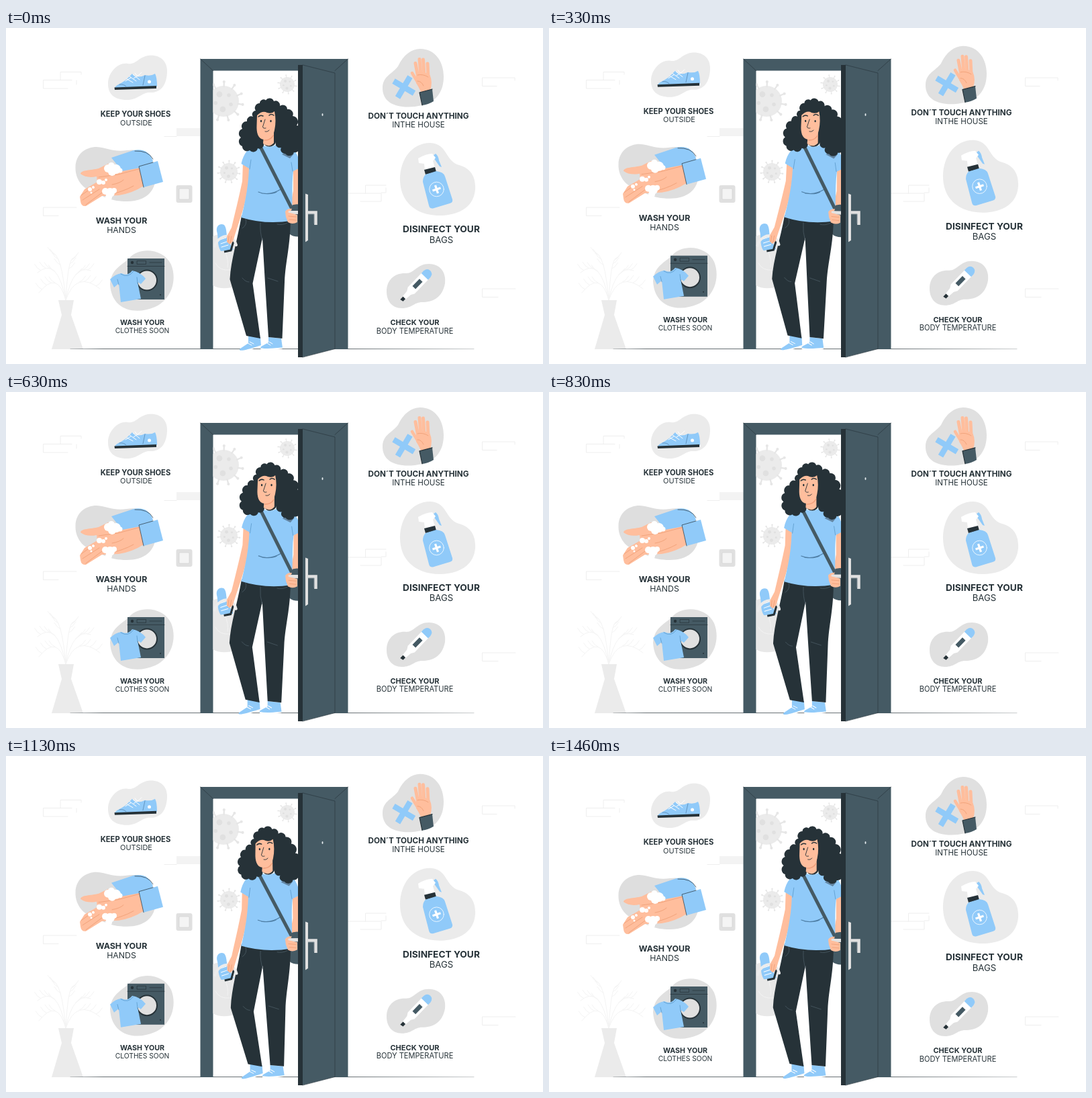
These frames come from a looping animation (800x500 px, 1500 ms). An HTML page:

```html
<!DOCTYPE html>
<html lang="en">
<head>
<meta charset="utf-8">
<title>Coming home safely</title>
<style>
  html, body { margin: 0; width: 100%; height: 100%; overflow: hidden; background: #fff; }
  svg { display: block; width: 100%; height: 100%; }
  text { font-family: Inter, sans-serif; fill: #263238; text-anchor: middle; }
  .b { font-weight: 700; }
  .blue { fill: #90caf9; }
  .dark { fill: #263238; }
  .slate { fill: #455a64; }
  .skin { fill: #ffbe9d; }
  .grey { fill: #e0e0e0; }
  .pale { fill: #ebebeb; }
  .white { fill: #fff; }
  .line { fill: none; stroke-linecap: round; stroke-linejoin: round; }
  .butt { fill: none; stroke-linejoin: miter; }
  .fold { stroke: #eb996e; stroke-width: .7; }
  .ink { stroke: #263238; }
  .lace { stroke: #fff; stroke-width: 1; }
</style>
</head>
<body>
<svg viewBox="0 0 800 500">
  <defs>
    <linearGradient id="fade" gradientUnits="userSpaceOnUse" x1="96" y1="0" x2="697" y2="0">
      <stop offset="0" stop-color="#263238" stop-opacity=".25"/>
      <stop offset=".08" stop-color="#263238" stop-opacity=".7"/>
      <stop offset=".7" stop-color="#263238" stop-opacity=".7"/>
      <stop offset="1" stop-color="#263238" stop-opacity=".25"/>
    </linearGradient>
    <clipPath id="opening"><path d="M308.500 63.500H436V500H308.500Z"/></clipPath>
  </defs>

  <!-- wall -->
  <g class="line" stroke="#eee">
    <path d="M81 77.500V65.500H112V69M98 77.500H55.500V90H92M105 78V84"/>
    <path d="M105 267H55.500V279.500H78M236 161.500H254"/>
    <path d="M758 78V74H709.500V86.500H731M759 388H709.500V400.500H733"/>
    <path d="M566 234H535.500V246M535 246H559V258H528M510 246H535M566 238V245H559"/>
  </g>
  <path fill="#f3f3f3" d="M254 149H290V161H254Z"/>
  <rect class="grey" x="253.500" y="234" width="24" height="26" rx="3"/>
  <rect x="258" y="239" width="15" height="16" rx="1" fill="#f4f4f4" stroke="#cfcfcf" stroke-width=".6"/>
  <g id="leaves" class="line" stroke="#f4f4f4"></g>
  <path class="pale" d="M78 405H101L97 427L115 478H68L83 427Z"/>
  <path class="line" stroke="url(#fade)" d="M96 477.500L697 477.600"/>

  <!-- doorway -->
  <path class="slate" d="M289.500 46H509.500V478H490V68H436V63.500H308.500V478H289.500Z"/>
  <path class="line ink" stroke-width=".6" d="M289.500 46L308.500 63.500M490 63.500L509.500 46"/>

  <g clip-path="url(#opening)">
    <g id="germs"></g>
    <path fill="#e8e8e8" d="M308 310C320 304 332 308 340 318C346 340 346 370 342 384C330 389 316 388 308 383Z"/>
    <path class="line" stroke="#f3f3f3" d="M312 350Q318 362 334 360M326 332Q332 345 330 356"/>
  </g>

  <g clip-path="url(#opening)">
    <g id="woman">
      <path class="skin" d="M428 205L440 204V276L422 274L428 242Z"/>
      <path class="slate" d="M423 265Q432 260 442 264V310Q428 312 422 306Z"/>
      <!-- legs and shoes -->
      <path class="blue" d="M361 457L379 460L380 473L352 481Q346 481 349 477L361 469Z"/>
      <path class="blue" d="M391 460L410 462L412 476L382 478Q377 477 380 474L391 468Z"/>
      <path class="line" stroke="#fff" stroke-width="1.800" d="M349 480.500Q352 482 380 473M380 477Q388 479 411 476.500"/>
      <path class="line lace" d="M360 469L366 472M363 467L369 470M389 469L394 472M392 467L397 470"/>
      <path class="dark" d="M351 279H424C424 325 416.500 345 415 378L411.500 462L391 460L386 380L382 312L367.500 380L379 462L358 458L333.500 374C335 345 345 315 351 279Z"/>
      <path class="line" stroke="#50616a" stroke-width=".7" d="M379 290Q378 304 382 316M362 378Q357 378 352 372M390 372L405 377M357 284Q360 293 352 298M404 292Q411 294 419 290"/>
      <!-- carried things and near arm -->
      <path class="blue" d="M314 302C313 294 319 290 325 293C330 299 327 310 332 318L339 330L320 332C314 323 317 313 314 302Z"/>
      <path class="line lace" d="M319 315L328 312M320 321L329 318M321 326L331 323"/>
      <path class="butt" stroke="#263238" stroke-width="3" d="M339 317L335 331L325 333"/>
      <path class="line" stroke="#ececec" stroke-width="4" d="M311 325C314 314 326 306 335 312Q341 315 343 323"/>
      <path class="skin" d="M353 200L365 205C362 235 358 256 350 280L341 308L338 318L333 322L329 318V310L336 297C341 276 347 252 352 228Z"/>
      <path class="line fold" d="M332 310L331 319M336 310L334 320"/>
      <!-- shirt -->
      <path class="blue" d="M376 171Q390 181 404 173L426 179Q434 184 440 207L428 213C425 235 428 258 425 287Q386 293 350.500 282C357 256 361 235 362 209L350.500 202C354 186 361 178 376 171Z"/>
      <path class="line" stroke="#5b9acb" stroke-width=".8" d="M363 210L365 196M427 213L425 200"/>
      <path class="line" stroke="#4f7fa6" stroke-width="1.200" d="M376 244Q392 251 411 239M381 246Q396 248 403 244"/>
      <path class="butt" stroke="#455a64" stroke-width="5" d="M376 171L427 271"/>
      <path d="M411 188Q420 182 429 187L423 194Z" fill="#6385a2"/>
      <!-- head -->
      <path id="hair" class="dark"/>
      <path class="skin" d="M384 158L399 151V171Q392 179 383 172Z"/>
      <path class="line" stroke="#f0a07c" stroke-width="1.600" d="M385 167Q394 167 398 160"/>
      <path class="skin" d="M374 130Q382 122 389 126Q396 128 400 124Q403 138 400 152C398 162 392 167 384 166C375 165 373 155 373.500 145Z"/>
      <path class="line ink" stroke-width="1.500" d="M376 132Q379 129 383 131M392 130Q395 127 399 130"/>
      <path class="line ink" stroke-width=".9" d="M386 136L382.500 147Q383 150 387 149M386 154Q390 155 392 152"/>
      <ellipse class="dark" cx="380" cy="138.500" rx="1.200" ry="1.700"/>
      <ellipse class="dark" cx="394.500" cy="138.500" rx="1.200" ry="1.700"/>
      <!-- hand on the handle -->
      <path class="grey" d="M420 272H437V277H420Z"/>
      <path class="skin" d="M416 273Q420 268 426 269L423 275L434 278V289Q427 293 420 289L417 281Z"/>
      <path class="line fold" d="M421 280L432 281M422 285L432 286"/>
      <path class="line" stroke="#e4e4e4" stroke-width="3" d="M422 273.500H436"/>
    </g>
  </g>

  <!-- open door -->
  <path class="slate" d="M441 55L490 67V477.500L441 490Z"/>
  <path class="dark" d="M435 55H442V490H435Z"/>
  <path class="line ink" stroke-width=".6" d="M442 55L490 67V477.500L442 490"/>
  <ellipse cx="471.500" cy="129" rx="1" ry="2" fill="#e8eef1"/>
  <path class="grey" d="M446 246.500L450 248V316L446 318.500Z"/>
  <path class="butt" stroke="#e0e0e0" stroke-width="4.500" d="M448 274.500H461.500V293"/>
  <path class="butt" stroke="#9aa5aa" stroke-width=".7" d="M450 277H459V291"/>

  <g id="tips">
    <!-- shoes -->
    <path class="pale" d="M152 83C152 65 168 51 181 53C194 55 196 44 212 41C230 39 241 50 240 66C239 88 228 97 214 96C202 96 197 107 180 107C161 107 152 98 152 83Z"/>
    <path class="blue" d="M162 89C164 84 174 82 180 76L188 68Q196 76 207 70Q216 72 222 68Q225 73 225 87L163 91Z"/>
    <path class="dark" d="M161.500 88.500L224 86V90L162 92Z"/>
    <path class="line lace" d="M180 76L189 81M184 72L194 79M189 69L199 77M178 79L186 74M190 75L198 70L202 66M192 67L196 72"/>
    <circle class="white" cx="213.500" cy="80" r="2.500"/>
    <path class="line" stroke="#4f7fa6" stroke-width=".7" d="M207 71L204 85M169 84Q175 83 179 87"/>
    <text class="b" x="193" y="132" font-size="11.200">KEEP YOUR SHOES</text>
    <text x="194" y="144.500" font-size="10.900">OUTSIDE</text>

    <!-- hands -->
    <path fill="#dedede" d="M103.500 207C104 187 119 177 135 177C151 178 160 185 180 182C207 178 224 194 223 220C223 246 205 258 180 258C152 258 145 249 127 243C112 237 103 223 103.500 207Z"/>
    <path class="blue" d="M157 193L190 182Q212 178 219 198L206 218L173 213Z"/>
    <path class="skin" d="M111 217C112 211 126 212 138 209L152 202L173 213L200 208L205 235Q188 246 168 249L143 250L119 265Q112 266 111 258L110 251L117 240L136 229L135 221Q120 224 111 217Z"/>
    <path class="line fold" d="M138 222L167 218L201 209M158 233Q170 231 175 226M114 256L139 240M119 263L143 245M112 249L132 235M150 249Q174 244 190 235"/>
    <path class="blue" d="M198 206L226 198L234 229L205 237Z"/>
    <path class="line ink" stroke-width=".7" d="M205 237L198 206L219 200M192 183Q212 182 219 195"/>
    <g id="foam" class="white"></g>
    <text class="b" x="172" y="291" font-size="12.400">WASH YOUR</text>
    <text x="172" y="305" font-size="12.300">HANDS</text>

    <!-- clothes -->
    <path class="grey" d="M155 381C157 357 174 353 184 342C199 325 235 328 246 352C256 377 245 405 222 415C192 428 157 420 155 381Z"/>
    <path class="slate" d="M181 343H236V404H181Z"/>
    <path class="line ink" stroke-width=".7" d="M181 354.500H236M195.500 346.500H208.500V351.500H195.500ZM214 349H232"/>
    <circle cx="188" cy="349" r="2.200" class="dark"/>
    <circle cx="210" cy="375.500" r="15" class="grey" stroke="#263238" stroke-width="2"/>
    <circle cx="230" cy="397" r="1" class="dark"/>
    <path class="blue" d="M155 374Q163 366 172 365Q181 370 188 361Q200 363 208 373L201 381L196 378L201 403L171 408L168 380L161 386Z"/>
    <path class="line" stroke="#5b9acb" stroke-width=".8" d="M168 382L166 374M196 380L195 371M171 366Q182 373 190 362"/>
    <text class="b" x="203" y="442" font-size="10.700">WASH YOUR</text>
    <text x="203" y="454" font-size="10.300">CLOTHES SOON</text>

    <!-- do not touch -->
    <path class="grey" d="M561 88C562 71 576 68 584 57C592 40 604 31 617 31C640 31 652 51 652 72C652 96 640 110 620 115C589 122 560 115 561 88Z"/>
    <path class="butt" stroke="#90caf9" stroke-width="8.500" d="M577.500 79L608 97M602 72.500L583.500 103.500"/>
    <g class="line" stroke="#ffbe9d" stroke-width="5">
      <path d="M614 74L610 52.500M618 70L616 46.500M623 70L621.500 47M629 74L628 53"/>
      <path stroke-width="4.500" d="M616 85L605 67"/>
    </g>
    <path class="skin" d="M611.500 69Q622 63 631.500 70Q636 80 632 93L618 95Q614 86 611 82Z"/>
    <path class="line fold" d="M613 79Q619 79 622 86M613 70Q621 68 629 73"/>
    <path class="slate" d="M616 96L635 91L637 109Q629 114 620 115Z"/>
    <path class="line ink" stroke-width="1.200" d="M620 115L616 96L635 91"/>
    <text class="b" x="614.500" y="134.500" font-size="11.700">DON´T TOUCH ANYTHING</text>
    <text x="614.500" y="147.500" font-size="11.600">INTHE HOUSE</text>

    <!-- disinfect -->
    <path class="pale" d="M587 225C587 195 605 171 632 171C658 172 654 198 675 204C694 209 700 224 699 240C697 268 672 279 646 279C610 279 587 258 587 225Z"/>
    <path class="blue" d="M635 191L640 187Q644 190 645 197L649 207L646 206L639 196Z"/>
    <path class="white" d="M614 194Q626 187 635 187L640 193L636 198L639 208L624 211L623 202L615 201Z"/>
    <path class="dark" d="M623 211L639 207L641 214L625 218Z"/>
    <path class="blue" d="M625 218L641 213Q652 214 654 221L665 255Q666 260 661 261L636 268.500Q631 269 630 264L621 229Q621 222 625 218Z"/>
    <circle class="line" cx="641.500" cy="240" r="10.800" stroke="#fff" stroke-width=".8"/>
    <path class="butt" stroke="#fff" stroke-width="3.200" d="M635.500 242L647.500 238M639.500 234L643.500 246"/>
    <text class="b" x="648.500" y="304" font-size="13.700">DISINFECT YOUR</text>
    <text x="648.500" y="319.500" font-size="13.200">BAGS</text>

    <!-- temperature -->
    <path class="grey" d="M567 392C567 374 580 364 596 365C609 365 612 351 630 351C648 351 656 365 654 380C650 402 635 408 620 408C608 408 605 417 590 417C574 417 567 405 567 392Z"/>
    <g transform="translate(612 382) rotate(-46)">
      <path class="dark" d="M-33 -2.500H-25V2.500H-32Z"/>
      <path class="white" d="M-27 -3L-17 -4L-12 -7H18V7H-12L-17 4L-27 3Z"/>
      <path class="blue" d="M17 -7H22Q29 -6 29 0T22 7H17Z"/>
      <rect class="slate" x="-6" y="-3.200" width="15" height="6.400"/>
    </g>
    <text class="b" x="609" y="442" font-size="11">CHECK YOUR</text>
    <text x="609" y="454.500" font-size="11.100">BODY TEMPERATURE</text>
  </g>
</svg>

<script>
const $ = id => document.getElementById(id);
const path = d => `<path d="${d}"/>`;
const dot = (x, y, r, fill) => `<circle cx="${x}" cy="${y}" r="${r}"${fill ? ` fill="${fill}"` : ''}/>`;

// Closed outline of outward bumps
function curls(points) {
  let [px, py] = points[points.length - 1], d = `M${px} ${py}`;
  for (const [x, y] of points) {
    const r = Math.hypot(x - px, y - py) * .56;
    d += `A${r} ${r} 0 0 1 ${x} ${y}`;
    [px, py] = [x, y];
  }
  return d + 'Z';
}

function germ(x, y, r, spikes) {
  let out = dot(x, y, r, '#ebebeb');
  for (let i = 0; i < spikes; i++) {
    const a = (i + .3) / spikes * Math.PI * 2, c = Math.cos(a), s = Math.sin(a), e = r * 1.26;
    out += `<path d="M${x + c * r * .9} ${y + s * r * .9}L${x + c * e} ${y + s * e}" stroke="#e6e6e6" stroke-width="${r * .1}"/>`
      + dot(x + c * e, y + s * e, r * .09, '#e6e6e6');
  }
  for (let i = 0; i < 5; i++) {
    const a = i * 1.26 + .4;
    out += dot(x + Math.cos(a) * r * .52, y + Math.sin(a) * r * .52, r * (.12 + i % 2 * .07), '#e0e0e0');
  }
  return out;
}

// Arching stem with small side leaves
function stem([x, y, lift]) {
  const cx = 89 + (x - 89) * .3, cy = y - lift, k = Math.sign(x - 89);
  let d = `M89 405Q${cx} ${cy} ${x} ${y}`;
  for (let t = .5; t < .95; t += .14) {
    const u = 1 - t;
    const bx = u * u * 89 + 2 * u * t * cx + t * t * x, by = u * u * 405 + 2 * u * t * cy + t * t * y;
    d += `M${bx} ${by}q${k * 5} -2 ${k * 9} -9`;
  }
  return path(d);
}

$('hair').setAttribute('d', curls([
  [372, 123], [378, 112], [387, 107.500], [399, 109], [408, 116], [419, 121], [427, 131],
  [433, 145], [438, 160], [437, 175], [429, 185], [416, 187], [410, 178], [402, 170],
  [384, 172], [375, 179], [363, 182], [352, 176], [350, 163], [352, 150], [359, 139], [368, 132]
]));
$('germs').innerHTML = germ(324, 109, 23, 11) + germ(419, 84, 11, 10) + germ(332, 214, 13, 11);
$('leaves').innerHTML = [[49, 394, 35], [47, 364, 25], [69, 335, 0], [100, 343, 0], [126, 361, 10], [140, 388, 28]].map(stem).join('');
$('foam').innerHTML = [
  [152, 209, 6], [157, 205, 5], [164, 210, 7], [158, 214, 6], [170, 212, 3.500],
  [148, 243, 5], [155, 245, 7], [161, 242, 4], [153, 252, 5],
  [139, 229, 4], [145, 230, 3], [149, 226, 2], [125, 240, 3], [130, 237, 2], [127, 245, 1.500]
].map(p => dot(...p)).join('');

const FRAMES = 36, LOOP = 1500, RISE = 9.4, SWAY = .84;

function draw() {
  const t = performance.now() % LOOP;
  const n = Math.floor(t * FRAMES / LOOP + .1) % FRAMES;
  const lift = RISE * (1 - Math.abs(1 - n / 17.5));
  const turn = SWAY * Math.sin(n / FRAMES * Math.PI * 2);
  $('tips').setAttribute('transform', `translate(0 ${-lift})`);
  $('woman').setAttribute('transform', `rotate(${turn} 390 285)`);
  requestAnimationFrame(draw);
}
draw();
</script>
</body>
</html>
```
